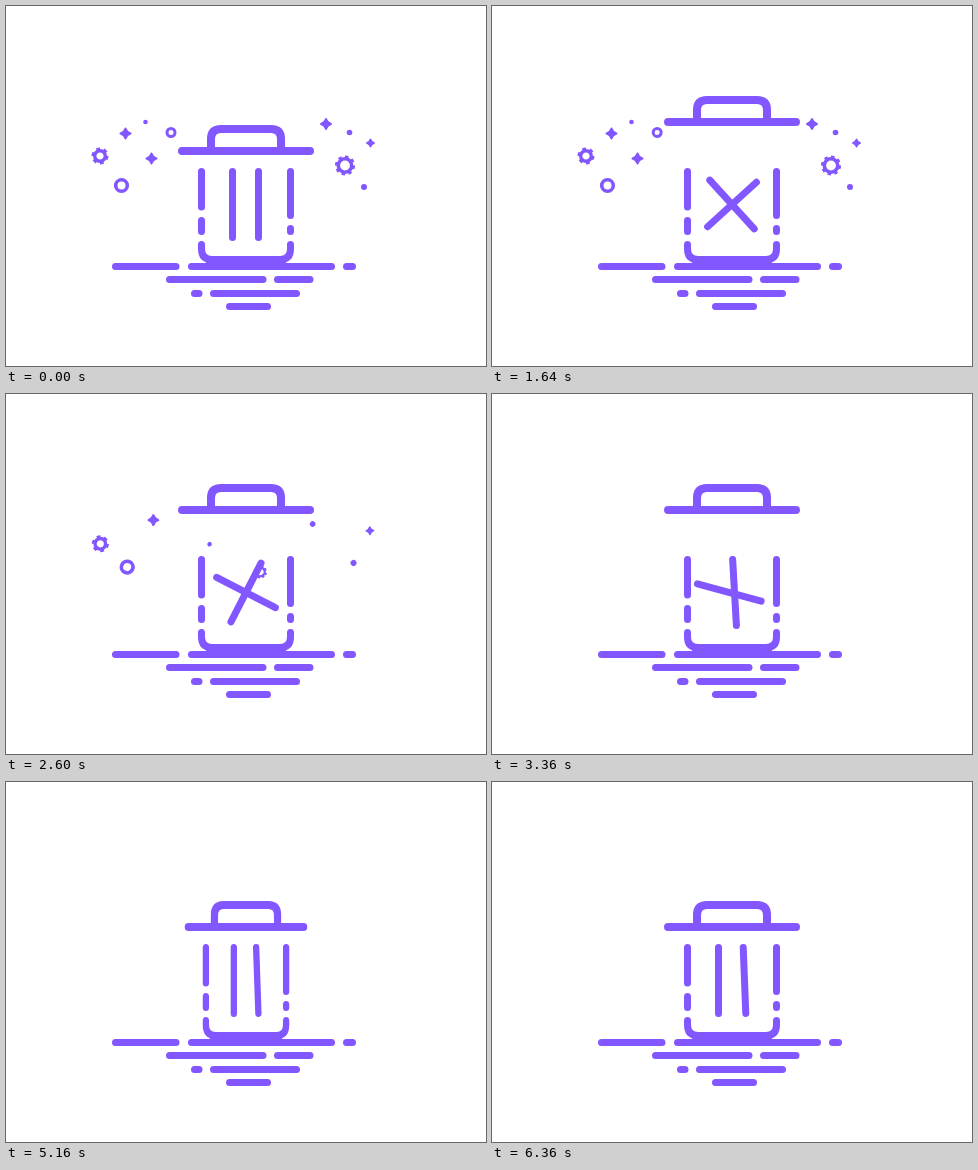
An HTML page that plays this animation: 480 px wide and 360 px high, repeating every 7.2 s.

```html
<!DOCTYPE html>
<html lang="en">
<head>
<meta charset="utf-8">
<title>Trash bin</title>
<style>
  html, body { margin: 0; width: 100%; height: 100%; overflow: hidden; background: #fff; }
  svg { display: block; width: 100vw; height: 100vh; }
  .line { fill: none; stroke: #8257ff; stroke-width: 7; stroke-linecap: round; stroke-linejoin: round; }
  .lid { stroke-width: 8; }
</style>
</head>
<body>
<svg viewBox="0 0 480 360">
  <path class="line" d="M109.5 260.5H170M185.5 260.5H325.5M340.5 260.5H346.5
    M163.5 273.5H257M271.5 273.5H304M188.5 287.5H193M207.5 287.5H290.5M223.5 300.5H261.5"/>
  <g id="bin">
    <path class="line" d="M195.5 165.5V201M195.5 214.5V225.5M195.5 238.5V243Q195.5 253.5 206 253.5
      H274Q284.5 253.5 284.5 243V238.5M284.5 165.5V209.5M284.5 222.5V225.5M203 254.5H277"/>
    <path class="line" id="left" d="M0-33V33"/>
    <path class="line" id="right" d="M0-33V33"/>
    <path class="line lid" id="lid" d="M176 145H304M205 143V133Q205 123 215 123H265Q275 123 275 133V143"/>
  </g>
  <g id="bits" fill="#8257ff" stroke="#8257ff"></g>
</svg>
<script>
const LOOP = 7200, STEP = 40, FLIGHT = 800;
const CENTER = { x: 240, y: 198.5 };
const $ = id => document.getElementById(id);
const clamp = v => Math.min(1, Math.max(0, v));
const linear = (t, from, to) => clamp((t - from) / (to - from));
const ease = (t, from, to) => {
  const u = linear(t, from, to);
  return u * u * (3 - 2 * u);
};

const dot = r => `<circle r="${r}" stroke="none"/>`;
const ring = (r, width) => `<circle r="${r}" fill="none" stroke-width="${width}"/>`;
const star = size => `<path transform="scale(${size})" stroke-width="2" stroke-linejoin="round"
  d="M0-5Q1.2-1.2 5 0Q1.2 1.2 0 5Q-1.2 1.2-5 0Q-1.2-1.2 0-5Z"/>`;
const gear = (r, width, teeth) => ring(r, width) +
  `<circle r="${r + width / 2}" fill="none" stroke-width="${width * 0.9}"
    pathLength="${teeth * 2}" stroke-dasharray="1"/>`;

// x, y, time of departure, shape
const bits = [
  [165, 126.5, 1600, ring(4, 3)],
  [320, 118, 1680, star(1)],
  [145.5, 152.5, 1760, star(1)],
  [339, 159.5, 1855, gear(6.7, 3.6, 8)],
  [139.5, 116, 1950, dot(2.3)],
  [343.5, 126.5, 2107, dot(2.8)],
  [119.5, 127.5, 2200, star(1)],
  [358, 181, 2350, dot(3)],
  [115.5, 179.5, 2420, ring(5.8, 3.6)],
  [364.5, 137, 2540, star(0.75)],
  [94, 150, 2560, gear(5.3, 3.4, 6)]
].map(([x, y, start, shape]) => {
  const node = document.createElementNS("http://www.w3.org/2000/svg", "g");
  node.innerHTML = shape;
  $("bits").append(node);
  return { x, y, start, node };
});

// Quadratic arc from the resting place, over the rim, into the bin.
function drawBit({ x, y, start, node }, t) {
  const u = linear(t, start, start + FLIGHT) ** 2;
  const arc = (from, over, to) => (1 - u) ** 2 * from + 2 * u * (1 - u) * over + u * u * to;
  const px = arc(x, x + (CENTER.x - x) * 0.45, CENTER.x);
  const py = arc(y, 112, CENTER.y);
  const size = clamp((1 - u) * 5);
  const turn = (x < CENTER.x ? 360 : -360) * u;
  node.setAttribute("transform", `translate(${px} ${py}) rotate(${turn}) scale(${size})`);
  node.style.display = u < 1 ? "" : "none";
}

function drawSlats(t) {
  const cross = ease(t, 480, 1210) - ease(t, 3100, 4000);
  const spin = t < 1600 ? 0 : 360 * ease(t, 1523, 3830);
  const lean = t < 1600 ? 0 : -2.2 * (1 - cross);
  const place = (id, side, tilt) => {
    const x = CENTER.x + side * 13 * (1 - cross) - 0.5 * (1 - cross);
    $(id).setAttribute("transform",
      `translate(${x} ${CENTER.y}) rotate(${spin + side * 45 * cross + tilt})`);
  };
  place("left", -1, 0);
  place("right", 1, lean);
}

function drawBin(t) {
  const open = ease(t, 400, 960) - ease(t, 4000, 4400);
  $("lid").setAttribute("transform", `translate(0 ${-29 * open})`);

  const squeeze = 0.27 * ease(t, 4800, 5680);
  const release = ease(t, 5800, 5960);
  const swell = release * (1 - ease(t, 5960, 6360));
  const sx = 1 - squeeze * (1 - release) + 0.47 * swell;
  const sy = 1 + 0.065 * swell;
  $("bin").setAttribute("transform",
    `translate(240 258) scale(${sx} ${sy}) translate(-240 -258)`);
}

function frame() {
  const t = Math.floor(performance.now() % LOOP / STEP) * STEP;
  drawBin(t);
  drawSlats(t);
  bits.forEach(bit => drawBit(bit, t));
  requestAnimationFrame(frame);
}
frame();
</script>
</body>
</html>
```
